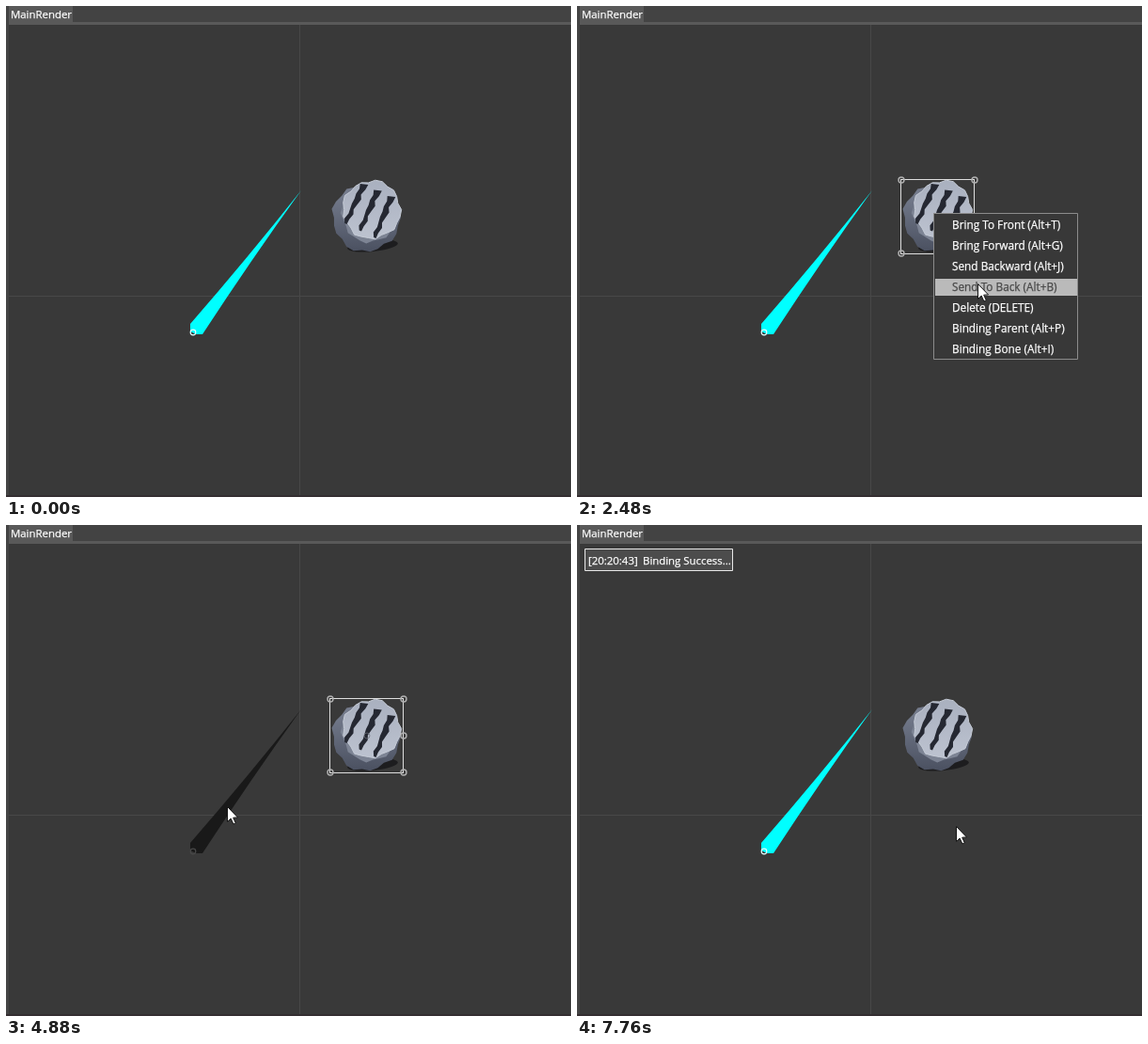
Recreate the animation shown at these times as an HTML page with a canvas. Size 601 px wide and 522 px high, loop 8 s.

```html
<!DOCTYPE html>
<html lang="en">
<head>
<meta charset="utf-8">
<style>
html, body { margin: 0; width: 100%; height: 100%; overflow: hidden; background: #393939; }
canvas { display: block; }
</style>
</head>
<body>
<canvas id="stage" width="601" height="522"></canvas>
<script>
const ctx = document.getElementById('stage').getContext('2d');
const LOOP = 8000, STEP = 60;
const MENU = ['Bring To Front (Alt+T)', 'Bring Forward (Alt+G)', 'Send Backward (Alt+J)',
  'Send To Back (Alt+B)', 'Delete (DELETE)', 'Binding Parent (Alt+P)', 'Binding Bone (Alt+I)'];

// Pointer stops; each move begins at the previous stop
const STOPS = [
  { x: 582, y: 393 },
  { start: 500, steps: 13, x: 379, y: 220 },
  { start: 2300, steps: 13, x: 460, y: 364 },
  { start: 4040, steps: 8, x: 235, y: 299 },
  { start: 5360, steps: 1, x: 236, y: 298 },
  { start: 6140, steps: 9, x: 402, y: 318 },
  { start: 6920, steps: 1, x: 403, y: 320 }
];

function rect(x, y, w, h, fill) {
  ctx.fillStyle = fill;
  ctx.fillRect(x, y, w, h);
}

function box(x, y, w, h, radius, fill, stroke) {
  ctx.beginPath();
  ctx.roundRect(x + .5, y + .5, w - 1, h - 1, radius);
  ctx.fillStyle = fill;
  ctx.fill();
  ctx.lineWidth = 1;
  ctx.strokeStyle = stroke;
  ctx.stroke();
}

function fade(y0, y1, top, bottom) {
  const g = ctx.createLinearGradient(0, y0, 0, y1);
  g.addColorStop(0, top);
  g.addColorStop(1, bottom);
  return g;
}

function shape(data, fill, stroke) {
  const path = new Path2D(data + 'Z');
  ctx.fillStyle = fill;
  ctx.fill(path);
  if (!stroke) return;
  ctx.lineWidth = 1;
  ctx.strokeStyle = stroke;
  ctx.stroke(path);
}

function ring(x, y, r, color, width = 1) {
  ctx.beginPath();
  ctx.arc(x, y, r, 0, 7);
  ctx.lineWidth = width;
  ctx.strokeStyle = color;
  ctx.stroke();
}

function text(str, x, y, color = '#fff', align = 'left', size = 11.4) {
  ctx.font = size + 'px "Open Sans", "Noto Sans", sans-serif';
  ctx.textAlign = align;
  ctx.fillStyle = ctx.strokeStyle = color;
  ctx.lineWidth = .25;
  ctx.fillText(str, x, y);
  ctx.strokeText(str, x, y);
}

function eachItem(drawItem) {
  MENU.forEach((label, i) => drawItem(label, 223 + 22 * i));
}

function menuText(label, y, color) {
  text(label, 399, y + 14, color, 'left', 11.8);
}

function drawPanel() {
  rect(0, 0, 601, 522, '#393939');
  rect(0, 0, 601, 18, '#434343');
  rect(0, 0, 3, 522, '#444');
  rect(3, 0, 68, 18, '#595959');
  rect(3, 17, 598, 3, '#595959');
  rect(0, 520, 601, 2, '#342e31');
  rect(312, 20, 1, 500, '#484848');
  rect(3, 308, 598, 1, '#484848');
  text('MainRender', 5, 13);
}

function drawBone(dark) {
  shape('M314 196Q256 269 196 338V346L202 349H209Q260 271 314 196', dark ? '#191919' : '#0ff');
  ring(199, 347, 2.8, dark ? '#484848' : '#e4ffff', 1.2);
}

// Closed outline with a chipped edge
function stone(cx, cy, rx, ry, phase) {
  const points = Array.from({ length: 26 }, (_, i) => {
    const a = i / 26 * 2 * Math.PI;
    const r = 1 + .045 * Math.sin(9 * a + phase) + .025 * Math.sin(4 * a);
    return [cx + rx * r * Math.cos(a), cy + ry * r * Math.sin(a)];
  });
  return 'M' + points.join(' ');
}

// Tapering, ragged cut running down to the left
function groove(x0, y0, x1, y1) {
  const left = [], right = [];
  for (let k = 0; k <= 8; k++) {
    const p = k / 8;
    const x = x0 + (x1 - x0) * p + Math.sin(k * 2.4);
    const y = y0 + (y1 - y0) * p;
    const half = 3.6 - 1.8 * p + .7 * Math.cos(k * 1.9);
    left.push([x - half, y]);
    right.unshift([x + half, y + 1]);
  }
  return 'M' + left.concat(right).join(' ');
}

function drawRock() {
  ctx.fillStyle = 'rgba(18,18,20,.7)';
  ctx.beginPath();
  ctx.ellipse(390, 255, 27, 6, -.1, 0, 7);
  ctx.fill();
  shape(stone(383, 225, 35.5, 36, 2), fade(200, 262, '#747b8c', '#4a5060'));
  shape(stone(387, 220, 30, 31, 5), '#7d8494');
  shape(stone(389, 216.5, 30.5, 30.5, 1), fade(185, 249, '#a9b0bf', '#bdc3d0'), '#c6ccd7');
  for (let i = 0; i < 3; i++)
    shape(groove(381 + 14.5 * i, 189 + 6.5 * i, 361 + 15.5 * i, 231 + 7.5 * i), '#252832');
}

function drawSelection() {
  ctx.lineWidth = 1;
  ctx.strokeStyle = '#dedede';
  ctx.strokeRect(344.5, 184.5, 78, 79);
  for (const x of [345, 423])
    for (const y of [185, 263]) ring(x, y, 3, '#b0b0b0', 1.4);
  ring(423, 224, 3, '#b0b0b0', 1.4);
  ring(384, 224, 3, 'rgba(110,115,125,.7)');
}

function drawMenu(alpha, pointerY) {
  ctx.globalAlpha = alpha;
  box(379, 220, 154, 156, 0, '#383838', '#8c8c8c');
  eachItem((label, y) => {
    const hover = pointerY >= y && pointerY < y + 22;
    if (hover) rect(381, y + 10 - 9, 151, 18, '#bababa');
    menuText(label, y, hover ? '#484848' : '#fff');
  });
  ctx.globalAlpha = 1;
}

function drawButton(label, x, state) {
  const fill = { hover: '#b9b9b9', pressed: '#8c8c8c' }[state] || fade(313, 331, '#4d4d4d', '#424242');
  box(x, 313, 66, 19, 2, fill, state ? '#8a8a8a' : '#2b2b2b');
  text(label, x + 33, 327, state ? '#696969' : '#fff', 'center');
}

function drawDialog(yesState) {
  box(144, 219, 381, 126, 4, fade(247, 345, '#505050', '#575757'), '#1e1e1e');
  rect(146, 221, 377, 26, fade(221, 247, '#3c3c3c', '#343434'));
  text('Prompt', 151, 238);
  rect(506, 224, 12, 10, '#777');
  ctx.lineWidth = 2.6;
  ctx.strokeStyle = '#d2d2d2';
  ctx.stroke(new Path2D('M508 225l8 8m0-8l-8 8'));
  text('Picture will be binding to bone.Picture can not be Unbound ...', 174, 276);
  drawButton('Yes', 375, yesState);
  drawButton('No', 446);
}

function drawToast() {
  box(8, 25, 158, 24, 0, '#4c4c4c', '#e8e8e8');
  text('[20:20:43]', 12, 42);
  text('Binding Success...', 70, 42);
}

function drawPointer({ x, y }) {
  ctx.save();
  ctx.translate(x + .5, y + .5);
  shape('M0 0V16L3.7 12.6 6.4 18.5 8.8 17.4 6.2 11.7 11 11.4', '#fff', '#141414');
  ctx.restore();
}

function pointerAt(t) {
  const i = STOPS.findLastIndex(stop => t >= stop.start);
  if (i < 0) return null;
  const from = STOPS[i - 1], to = STOPS[i];
  const left = 1 - Math.min(1, (Math.floor((t - to.start) / STEP) + 1) / to.steps);
  const glide = (axis, power) => Math.round(to[axis] + (from[axis] - to[axis]) * left ** power);
  return { x: glide('x', 2.4), y: glide('y', 2) };
}

function menuAlpha(t) {
  if (t < 1880 || t >= 3500) return 0;
  const steps = start => Math.floor((t - start) / STEP) + 1;
  return t < 3380 ? Math.min(1, steps(1880) / 3) : 1 - steps(3380) / 3;
}

function draw(t) {
  const pointer = pointerAt(t);
  const between = (a, b) => t >= a && t < b;
  drawPanel();
  drawBone(between(3380, 4460) || between(4880, 4940));
  if (between(3500, 4040))
    eachItem((label, y) => menuText(label, y, 'rgba(0,0,0,.17)'));
  drawRock();
  if (between(1520, 7700)) drawSelection();
  const alpha = menuAlpha(t);
  if (alpha) drawMenu(alpha, t < 2300 ? 0 : pointer.y);
  if (between(5600, 7700))
    drawDialog(t >= 7520 ? 'pressed' : pointer.x >= 375 ? 'hover' : '');
  if (t >= 7760) drawToast();
  if (pointer) drawPointer(pointer);
}

function tick() {
  draw(performance.now() % LOOP);
  requestAnimationFrame(tick);
}
tick();
</script>
</body>
</html>
```
